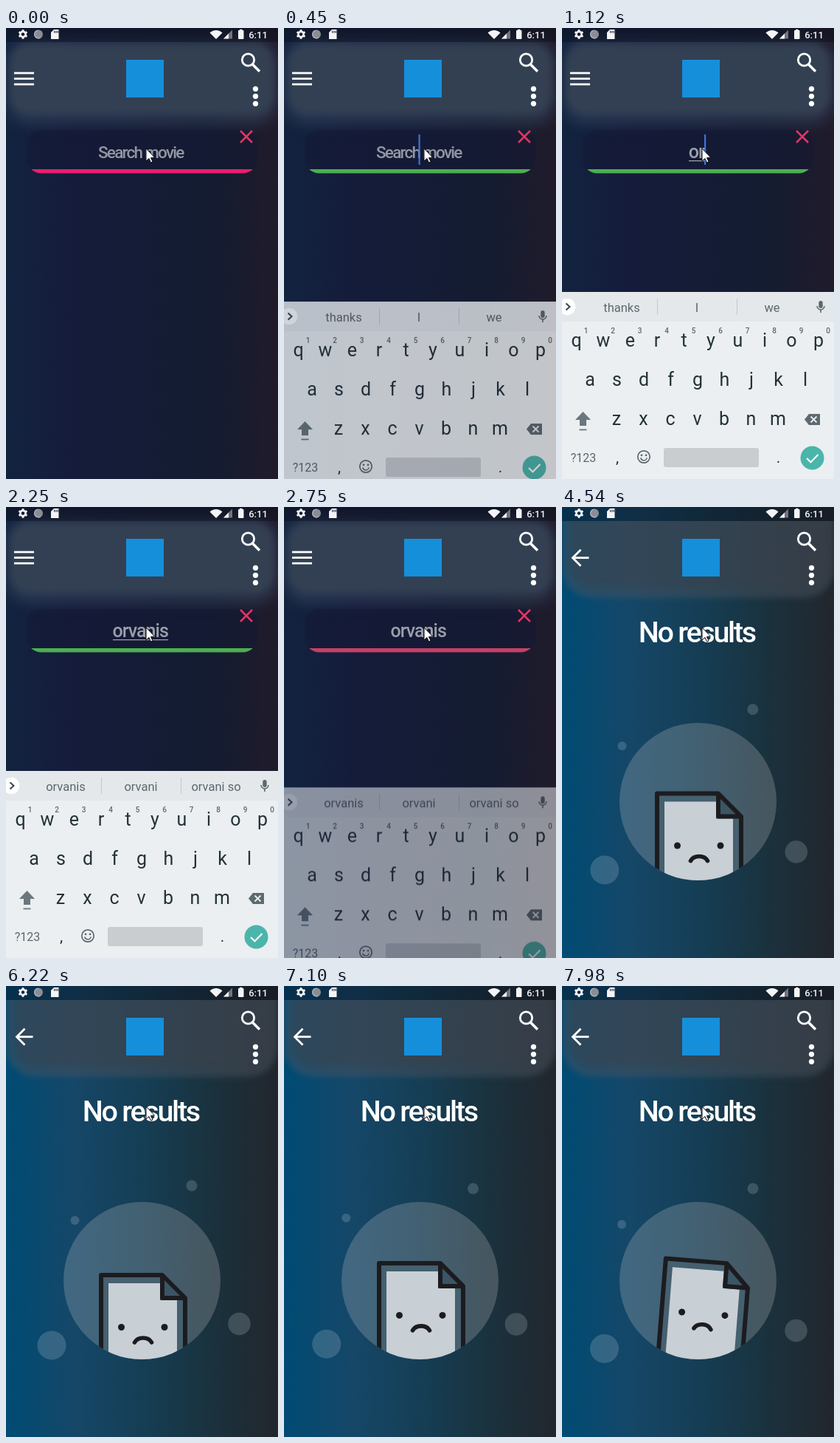
These frames come from a looping animation (369 px wide and 610 px high, 8000 ms). An HTML page with a canvas:

```html
<!DOCTYPE html>
<html lang="en">
<head>
<meta charset="utf-8">
<title>Movie search</title>
<style>
  html, body { margin: 0; width: 100%; height: 100%; overflow: hidden; background: #141b35; }
  canvas { display: block; width: 369px; height: 610px; }
</style>
</head>
<body>
<canvas id="stage" width="369" height="610"></canvas>
<script>
const W = 369, H = 610, LOOP = 8000;
const screen2d = document.getElementById('stage').getContext('2d');
const layer = document.createElement('canvas');
layer.width = W; layer.height = H;
const layer2d = layer.getContext('2d');
let g = screen2d;

const WORD = 'orvanis';
const TYPE_START = 990, KEY_GAP = 115;
const ROUTE_START = 2895, ROUTE_END = 3195;
const ART_START = 3510, BOB_START = 4330, BOB = 2180;
const SANS = 'Roboto, "Open Sans", sans-serif';
const PINK = [233, 30, 110], GREEN = [76, 175, 80];

// helpers
const clamp = v => Math.max(0, Math.min(1, v));
const span = (t, a, b) => clamp((t - a) / (b - a));
const mix = (a, b, k) => a + (b - a) * k;
const ease = (t, a, b) => { const k = span(t, a, b); return k * k * (3 - 2 * k); };
const rgb = (a, b, k) => `rgb(${a.map((v, i) => Math.round(mix(v, b[i], k)))})`;

function bezier(x, x1, y1, x2, y2) {
  const at = (s, p, q) => 3 * (1 - s) * (1 - s) * s * p + 3 * (1 - s) * s * s * q + s ** 3;
  let lo = 0, hi = 1;
  for (let i = 0; i < 24; i++) {
    const m = (lo + hi) / 2;
    if (at(m, x1, x2) < x) lo = m; else hi = m;
  }
  return at(lo, y1, y2);
}

function rect(x, y, w, h, fill, r = 0) {
  g.fillStyle = fill;
  g.beginPath();
  g.roundRect(x, y, w, h, r);
  g.fill();
}

function disc(x, y, r, fill) {
  g.fillStyle = fill;
  g.beginPath();
  g.arc(x, y, Math.max(0, r), 0, 7);
  g.fill();
}

function trace(points, close) {
  g.beginPath();
  points.forEach(([x, y], i) => i ? g.lineTo(x, y) : g.moveTo(x, y));
  if (close) g.closePath();
}

function line(points, color, width) {
  trace(points);
  g.strokeStyle = color;
  g.lineWidth = width;
  g.stroke();
}

function poly(points, fill) {
  trace(points, true);
  g.fillStyle = fill;
  g.fill();
}

function ring(x, y, r, color, width, a = 0, b = 7) {
  g.beginPath();
  g.arc(x, y, r, a, b);
  g.strokeStyle = color;
  g.lineWidth = width;
  g.stroke();
}

function cross(x, y, r, color, width) {
  line([[x - r, y - r], [x + r, y + r]], color, width);
  line([[x + r, y - r], [x - r, y + r]], color, width);
}

function text(str, x, y, size, color, weight = 400, spacing = 0) {
  g.font = `${weight} ${size}px ${SANS}`;
  g.letterSpacing = spacing + 'px';
  g.textAlign = 'center';
  g.textBaseline = 'alphabetic';
  g.fillStyle = color;
  g.fillText(str, x, y);
  return g.measureText(str).width;
}

// evenly spaced horizontal gradient
function backdrop(...colors) {
  const grad = g.createLinearGradient(0, 0, W, 0);
  colors.forEach((c, i) => grad.addColorStop(i / (colors.length - 1), c));
  g.fillStyle = grad;
  g.fillRect(0, 0, W, H);
}

function blurred(amount, draw) {
  g.save();
  g.filter = `blur(${amount}px)`;
  draw();
  g.restore();
}

// shared parts
function barIcons() {
  ring(328.5, 43, 8.2, '#fff', 2.8);
  line([[334, 48.7], [344, 58.7]], '#fff', 3.6);
  for (let i = -1; i < 2; i++) disc(338.5, 92.3 + i * 10, 3.6, '#fff');
}

function statusBar() {
  rect(0, 0, W, 19, 'rgba(10,12,24,.42)');
  const c = '#f4f4f6';
  ring(23, 8.5, 3.6, c, 2.6);
  for (let i = 0; i < 6; i++) {
    const a = (i + .5) * Math.PI / 3, x = Math.cos(a), y = Math.sin(a);
    line([[23 + x * 4, 8.5 + y * 4], [23 + x * 6.3, 8.5 + y * 6.3]], c, 2.8);
  }
  disc(44, 8.5, 6, '#8b8d94');
  ring(44, 8.5, 5.3, '#b4b6bb', 1.2, 1, 4.6);
  poly([[61, 6], [65, 2], [71.5, 2], [71.5, 15], [61, 15]], c);
  for (let i = 0; i < 3; i++) rect(65 + i * 2.3, 3.8, 1.2, 3, '#333342');
  g.fillStyle = c;
  g.beginPath();
  g.moveTo(285, 15);
  g.arc(285, 15, 12, -Math.PI * .75, -Math.PI * .25);
  g.fill();
  poly([[295, 14.5], [307, 14.5], [307, 2.5]], '#73747f');
  poly([[295, 14.5], [302, 14.5], [302, 7.5]], c);
  rect(315, 3, 7.5, 12, c, 1);
  rect(317, 1.8, 3.5, 2, c);
  text('6:11', 342, 13.5, 13, c, 500);
}

function pointer() {
  const p = [[190, 163], [190, 180], [194, 176.5], [196.5, 182], [199, 181], [196.5, 175.5], [201.5, 175]];
  poly(p, '#fff');
  line([...p, p[0]], '#101018', 1);
}

// search page
const typedAt = t => WORD.slice(0, Math.max(0, Math.floor((t - TYPE_START) / KEY_GAP) + 1));

function hints(t) {
  const word = typedAt(t - 60), stem = word.slice(0, -1);
  return stem ? [word, stem, stem + ' so'] : ['thanks', 'I', 'we'];
}

function searchPage(t) {
  backdrop('#12233f', '#151c3b', '#151c36', '#141c31', '#201b2b');
  blurred(9, () => rect(0, 14, W, 116, 'rgba(62,80,104,.5)', 32));
  blurred(4, () => rect(6, 22, W - 12, 94, 'rgba(53,66,84,.85)', 26));
  for (let i = -1; i < 2; i++) rect(11, 67.2 + i * 7.6, 27, 2.7, '#fff');
  barIcons();

  g.save();
  g.beginPath();
  g.roundRect(28, 138, 313, 58.5, 20);
  g.clip();
  rect(28, 138, 313, 59, 'rgba(21,24,52,.5)');
  rect(28, 191, 313, 6, rgb(PINK, GREEN, span(t, 40, 200) - span(t, 2630, 2790)));
  g.restore();
  cross(326, 147, 8, '#e33563', 2.5);

  const word = typedAt(t), ink = '#9c9faa';
  let width = 0;
  if (word) {
    width = text(word, 182.2, 176, 25, ink, 500, -1);
    if (t < 2630) rect(182.5 - width / 2, 179, width, 1.3, ink);
  } else {
    text('Search movie', 182.8, 176, 22.5, '#9497a2', 500, -1.75);
  }
  const blink = (t >= 280 && t < 780) || (t >= TYPE_START && t < 2250);
  if (blink) rect(182.5 + width / 2, 144, 2.2, 41, '#3f73d2');
}

function keyboard(t) {
  const enter = 1 - (1 - span(t, 300, 570)) ** 2;
  const leave = span(t, 2630, 2813) ** 2;
  const alpha = enter * (1 - leave);
  if (alpha <= 0) return;
  g = layer2d;
  g.clearRect(0, 0, W, H);
  const ink = '#243238', dim = '#5c686d';
  rect(0, 357, W, H, '#ebeff1');
  rect(0, 357, W, 40, '#e4e8eb');
  disc(7, 377, 11.3, '#fff');
  line([[5.5, 372.5], [10.5, 377], [5.5, 381.5]], '#37474f', 2);
  hints(t).forEach((s, i) => {
    text(s, 81 + i * 102, 384, 16.5, dim);
    if (i) rect(21 + i * 108, 366, 1, 22, '#c3c9cc');
  });
  rect(348.3, 369, 5.4, 10, dim, 2.7);
  ring(351, 376, 5, dim, 1.5, 0, Math.PI);
  rect(350.2, 381, 1.6, 4, dim);

  const row = (keys, x, y, size = 25, color = ink, weight = 400) =>
    [...keys].forEach((k, i) => text(k, x + i * 36.5, y, size, color, weight));
  row('1234567890', 32.5, 413, 10, dim, 500);
  row('qwertyuiop', 19.5, 431);
  row('asdfghjkl', 38, 484);
  row('zxcvbnm', 74, 537);

  poly([[28.5, 519], [39, 530], [33, 530], [33, 538], [24, 538], [24, 530], [18, 530]], '#6a777c');
  rect(23.5, 542.5, 10, 1.8, '#6a777c');
  poly([[329, 529.5], [335, 522], [350, 522], [350, 537], [335, 537]], '#5d6a70');
  cross(341.5, 529.5, 4, '#ebeff1', 1.8);
  text('?123', 29, 587, 16, dim);
  text(',', 75, 588, 21, ink);
  text('.', 293.5, 588, 21, ink);
  ring(111, 580, 8.2, dim, 1.7);
  disc(108, 577.8, 1.4, dim);
  disc(114, 577.8, 1.4, dim);
  ring(111, 580.5, 4.3, dim, 1.6, .2, Math.PI - .2);
  rect(138, 568, 129, 26, '#c9cdd0', 3);
  disc(339.5, 581.5, 16, '#4bb5ab');
  line([[332, 582], [337.5, 587.3], [347.5, 577]], '#fff', 2.2);

  g = screen2d;
  g.globalAlpha = alpha;
  g.drawImage(layer, 0, (1 - enter) * 67 + leave * 51);
  g.globalAlpha = 1;
}

// results page
function sadFile(t) {
  const phase = t < BOB_START ? 0 : (t - BOB_START) % BOB / BOB;
  const settle = ease(phase, .7, .86);
  const lift = 18.5 * (ease(phase, 0, .35) - settle) - 125 * (1 - ease(t, ART_START, 4280));
  const tilt = .08 * (ease(phase, .37, .67) - settle);
  const ink = '#1c1c1f';
  const sheet = [[129, 640], [129, 391], [212, 391], [243, 422], [243, 640]];
  const fold = [[212, 391], [212, 422], [243, 422]];

  g.save();
  g.translate(185, 537 - lift);
  g.rotate(tilt);
  g.translate(-185, -537);
  g.lineJoin = 'round';
  poly(sheet, '#45606f');
  poly([[139, 640], [139, 402], [209, 402], [209, 425], [232, 425], [232, 640]], '#c8cfd5');
  poly(fold, '#3b5565');
  line(sheet, ink, 6);
  line(fold, ink, 6);
  disc(156.5, 461.5, 4.5, ink);
  disc(215, 461.5, 4.5, ink);
  g.lineCap = 'round';
  g.beginPath();
  g.moveTo(174.5, 482);
  g.bezierCurveTo(179, 474, 193, 474, 197.5, 482);
  g.strokeStyle = ink;
  g.lineWidth = 5.6;
  g.stroke();
  g.restore();
}

function bubble(t, x, y, r, dx, dy, sway) {
  const a = Math.PI * (t - 6220) / 1760, k = (1 - Math.cos(a)) / 2, s = Math.sin(a) * sway;
  disc(x + dx * k + s * .5, y + dy * k + s, r * ease(t, ART_START, 3900), 'rgba(190,205,215,.22)');
}

function emptyState(t) {
  if (t < ART_START) return;
  bubble(t, 252, 270, 7.5, 7, 4, 2);
  bubble(t, 93.5, 317, 6, -12.5, 5.5, -6);
  bubble(t, 62, 486, 19.5, -4.5, 4.5, -4);
  bubble(t, 316.5, 457, 15.3, 1, 9, -4);
  const r = 106.5 * (1 - (1 - span(t, ART_START, 3800)) ** 3);
  disc(184.5, 398.5, r, 'rgba(208,206,206,.24)');
  g.save();
  g.beginPath();
  g.arc(184.5, 398.5, r, 0, 7);
  g.clip();
  sadFile(t);
  g.restore();
}

function resultsPage(t) {
  backdrop('#004b74', '#154768', '#153e55', '#1a323e', '#22262d');
  g.save();
  g.beginPath();
  g.rect(0, 19, W, H);
  g.clip();
  blurred(4, () => rect(0, 2, W, 121, 'rgba(84,94,106,.4)', [0, 0, 40, 40]));
  blurred(7, () => rect(7, 8, W - 14, 104, 'rgba(56,62,72,.5)', [0, 0, 34, 34]));
  g.restore();
  line([[36.5, 68.7], [14.5, 68.7]], '#fff', 2.8);
  line([[25.5, 57.7], [14.5, 68.7], [25.5, 79.7]], '#fff', 2.8);
  barIcons();
  text('No results', 182.8, 182.5, 39.5, '#fff', 500, -2.3);
  emptyState(t);
}

function openResults(t) {
  const k = span(t, ROUTE_START, ROUTE_END);
  if (!k) return;
  g = layer2d;
  g.clearRect(0, 0, W, H);
  resultsPage(t);
  g = screen2d;
  g.globalAlpha = bezier(k, .42, 0, 1, 1);
  g.drawImage(layer, 0, H / 4 * (1 - bezier(k, .4, 0, .2, 1)));
  g.globalAlpha = 1;
}

function draw(t) {
  g = screen2d;
  if (t < ROUTE_END) {
    searchPage(t);
    keyboard(t);
  }
  openResults(t);
  rect(163, 43, 51, 51, '#168fdb');
  statusBar();
  pointer();
}

const start = performance.now();
function tick() {
  draw((performance.now() - start) % LOOP);
  requestAnimationFrame(tick);
}
tick();
</script>
</body>
</html>
```
